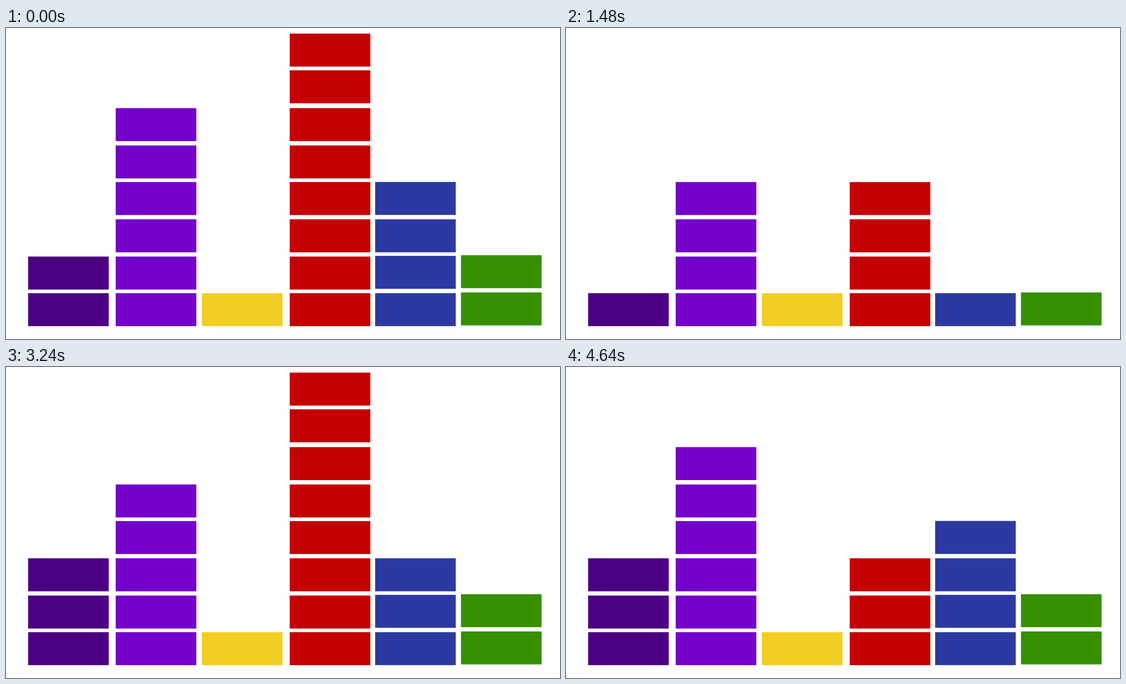
Recreate the animation shown at these times as a matplotlib script. Size 998 by 561 pixels, loop 4.8 s.

```python
import numpy as np
import matplotlib.pyplot as plt
from matplotlib.animation import FuncAnimation
from matplotlib.patches import Rectangle

W, H, DPI = 998, 561, 100
FRAMES, INTERVAL = 120, 40
BLOCK_W, BLOCK_H = 145.2, 59.5

# Block tops from the bottom row upwards
ROWS = [478.3, 412.3, 345.1, 277.9, 211.9, 144.5, 76.3, 10.1]
BLUE_ROWS = [478.3, 411, 345.1, 277.7]
GREEN_ROWS = [477, 409.8]

# First and last frame of each pose, with the bar levels from left to right
POSES = [
    (0, 0, [2, 6, 1, 8, 4, 2]),
    (1, 5, [1, 6, 1, 8, 4, 2]),
    (15, 16, [3, 5, 1, 3, 3, 2]),
    (37, 37, [1, 4, 1, 4, 1, 1]),
    (55, 55, [3, 3, 1, 8, 1, 2]),
    (81, 83, [3, 5, 1, 8, 3, 2]),
    (100, 100, [1, 5, 1, 6, 4, 2]),
    (116, 119, [3, 6, 1, 3, 4, 2]),
]

fig = plt.figure(figsize=(W / DPI, H / DPI), dpi=DPI, facecolor="white")
ax = fig.add_axes([0, 0, 1, 1])
ax.set_xlim(0, W)
ax.set_ylim(H, 0)
ax.axis("off")


class Bar:
    """A stack of blocks that swings up and down on its way between poses."""

    def __init__(self, x, color, tops, swing, period, low=1,
                 span=(0, FRAMES)):
        self.swing, self.period, self.low, self.span = swing, period, low, span
        self.blocks = [Rectangle((x, top), BLOCK_W, BLOCK_H, facecolor=color,
                                 linewidth=0, snap=False) for top in tops]
        for block in self.blocks:
            ax.add_patch(block)

    def level(self, start, end, u, a, b):
        value = a + (b - a) * u
        if self.span[0] <= start and end <= self.span[1]:
            cycles = max(1, round((end - start) / self.period))
            value -= self.swing * np.sin(2 * np.pi * cycles * u)
        return int(np.clip(value, self.low, len(self.blocks)) + 0.5)

    def show(self, level):
        for i, block in enumerate(self.blocks):
            block.set_visible(i < level)


bars = [
    Bar(39.8, "#4b0082", ROWS[:3], swing=1.2, period=9),
    Bar(197.6, "#7400cb", ROWS[:6], swing=2.2, period=12),
    Bar(353, "#f2ce24", ROWS[:1], swing=0, period=10),
    Bar(511.1, "#c40000", ROWS, swing=4, period=10),
    Bar(665, "#2c39a2", BLUE_ROWS, swing=1.6, period=14),
    Bar(819.6, "#368f00", GREEN_ROWS, swing=1.5, period=13, low=0,
        span=(16, 83)),
]


def update(frame):
    for (_, start, before), (end, _, after) in zip(POSES, POSES[1:]):
        if frame <= end:
            break
    u = np.clip((frame - start) / (end - start), 0, 1)
    for bar, a, b in zip(bars, before, after):
        bar.show(bar.level(start, end, u, a, b))
    return [block for bar in bars for block in bar.blocks]


anim = FuncAnimation(fig, update, frames=FRAMES, interval=INTERVAL,
                     repeat=True, repeat_delay=0)
plt.show()
```
